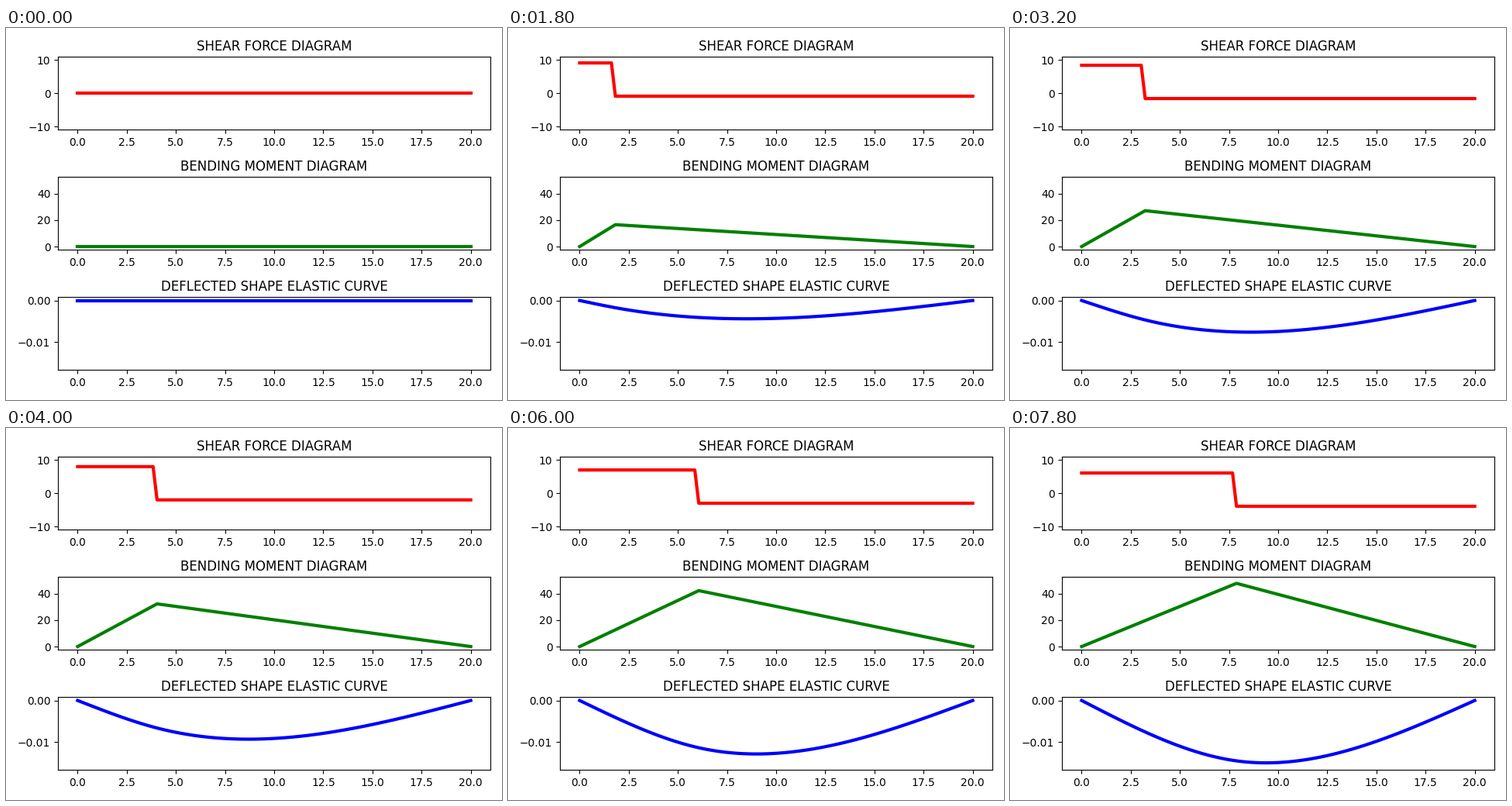
Recreate the animation shown at these times as a matplotlib script. Size 640x480 px, loop 8 s.

```python
import numpy as np
import matplotlib.pyplot as plt
from matplotlib.animation import FuncAnimation

SPAN, LOAD, EI = 20.0, 10.0, 105000.0
FRAMES, INTERVAL = 40, 200

x = np.linspace(0, SPAN, 100)


def shear(a):
    return np.where(x < a, LOAD * (SPAN - a) / SPAN, -LOAD * a / SPAN)


def moment(a):
    b = SPAN - a
    return np.where(x < a, LOAD * b * x / SPAN, LOAD * a * (SPAN - x) / SPAN)


def deflection(a):
    b, r = SPAN - a, SPAN - x
    left = b * x * (SPAN**2 - b**2 - x**2)
    right = a * r * (SPAN**2 - a**2 - r**2)
    return -LOAD * np.where(x < a, left, right) / (6 * SPAN * EI)


PLOTS = [
    ("SHEAR FORCE DIAGRAM", shear, "red", [-10, 0, 10]),
    ("BENDING MOMENT DIAGRAM", moment, "green", [0, 20, 40]),
    ("DEFLECTED SHAPE ELASTIC CURVE", deflection, "blue", [-0.01, 0]),
]

fig, axes = plt.subplots(3, 1, figsize=(6.4, 4.8), dpi=100)
lines = []
for ax, (title, func, color, ticks) in zip(axes, PLOTS):
    ax.set_title(title)
    line, = ax.plot(x, np.zeros_like(x), color=color, lw=3)
    lines.append(line)
    # Fixed limits cover the load's whole trip across the beam
    values = np.array([func(a) for a in x])
    low, high = values.min(), values.max()
    pad = 0.05 * (high - low)
    ax.set_xlim(-0.05 * SPAN, 1.05 * SPAN)
    ax.set_yticks(ticks)
    ax.set_ylim(low - pad, high + pad)
fig.tight_layout()


def update(i):
    for line, (_, func, _, _) in zip(lines, PLOTS):
        line.set_ydata(func(x[i]))
    return lines


anim = FuncAnimation(fig, update, frames=FRAMES, interval=INTERVAL,
                     repeat=True, repeat_delay=0)
plt.show()
```
